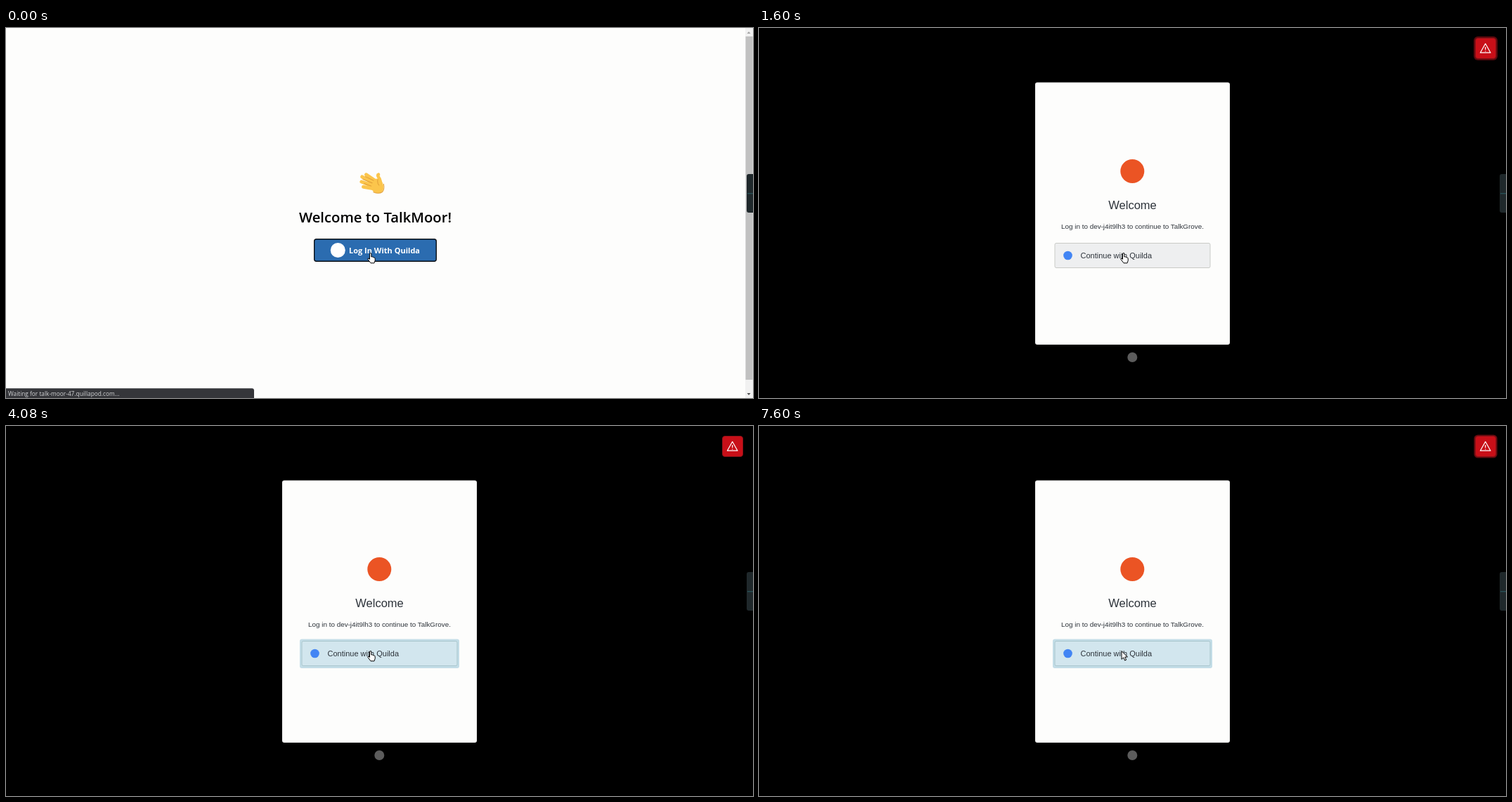
Animation, 1063 px wide and 527 px high, one loop 8000 ms. Source, as an HTML page:

```html
<!DOCTYPE html>
<html lang="en">
<head>
<meta charset="utf-8">
<title>Login flow</title>
<style>
  html, body { margin: 0; width: 100%; height: 100%; overflow: hidden; background: #000; }
  svg { display: block; width: 1063px; height: 527px; }
  .ui { font-family: "Open Sans", "Noto Sans", sans-serif; }
  .form { font-family: "Liberation Sans", Arial, sans-serif; fill: #2d333a; }
  .mid { text-anchor: middle; }
</style>
</head>
<body>
<svg viewBox="0 0 1063 527">
  <g id="home" class="ui">
    <rect width="1063" height="527" fill="#fdfdfc"/>
    <g id="wave" stroke-linecap="round" stroke-linejoin="round" fill="none">
      <g stroke="#fbc54c" stroke-width="5">
        <path d="M528 223L516 212M529 219L517.5 204.5M532 217L522 199M536 216L528.5 199.5"/>
        <path d="M538 222Q542 217 541.5 212Q541.5 208 543.5 208.500" stroke-width="4.500"/>
      </g>
      <path d="M524 218L536 212Q541 213 542 219Q541 229 535 231.500Q529 232.500 525 226Z" fill="#fbc54c" stroke="#fbc54c"/>
      <path d="M526 217L519.500 209M529.500 214L521 202.500M533 212L526 201M539 214Q535 218 536 222" stroke="#dd9a34" stroke-width=".9"/>
      <path d="M524 226Q529 233 535 232.500Q540 231 542.500 224" stroke="#e3a13a" stroke-width="1"/>
    </g>
    <text class="mid" x="525.5" y="277" font-size="20.3" font-weight="600">Welcome to TalkMoor!</text>
    <rect x="438.7" y="300.7" width="173.6" height="31.6" rx="3" fill="#2b6cb0" stroke="#0b0f14" stroke-width="1.4"/>
    <circle cx="472.300" cy="316.500" r="10.500" fill="#fff"/>
    <text x="488" y="321" font-size="11" font-weight="700" fill="#fff">Log In With Quilda</text>
    <rect x="1052" width="11" height="527" fill="#f1f1f1"/>
    <rect x="1052.5" y="12" width="10" height="489" fill="#c1c1c1"/>
    <path d="M1054.500 8h5l-2.500-3z" fill="#a3a3a3"/>
    <path d="M1054.500 520h5l-2.500 3z" fill="#505050"/>
  </g>

  <g id="login">
    <rect width="1063" height="527"/>
    <rect x="393" y="77.500" width="277" height="373.500" rx="3" fill="#fdfdfc"/>
    <circle cx="531.300" cy="204" r="17" fill="#eb5424"/>
    <circle cx="531.300" cy="469" r="7" fill="#5c5c5c"/>
    <g class="form">
      <text class="mid" x="531.5" y="257.500" font-size="16.5">Welcome</text>
      <text class="mid" x="531.5" y="285.500" font-size="9.9">Log in to dev-j4it9lh3 to continue to TalkGrove.</text>
      <rect id="ring" x="418" y="303.500" width="227" height="41.500" rx="3" fill="#c3dde7"/>
      <rect id="button" x="421" y="306.500" width="221" height="35" rx="2"/>
      <circle cx="439.500" cy="324" r="6.300" fill="#4285f4"/>
      <text x="457.5" y="328" font-size="11">Continue with Quilda</text>
    </g>
    <g id="alert">
      <rect id="glow" fill="#d0141f"/>
      <rect x="1019.5" y="14.500" width="29" height="29" rx="3.5" fill="#c80f18" stroke="#8f1218"/>
      <path d="M1033.700 22.300L1041 35.200H1026.400ZM1033.700 27v4M1033.700 32.600v1" fill="none" stroke="#fff" stroke-width="1.2" stroke-linejoin="round"/>
    </g>
  </g>

  <g id="status" class="ui">
    <path d="M0 513.300H350q3 0 3 3V527H0z" fill="#35363a"/>
    <text x="3" y="523.500" font-size="8.3" fill="#d2d3d5">Waiting for talk-moor-47.quillapod.com...</text>
  </g>

  <path d="M1063 208h-6q-3 0-3 3v49q0 3 3 3h6z" fill="#1f282b"/>
  <path d="M1055 235.800h8" stroke="#2b6268"/>

  <g fill="#fff" stroke="#000" stroke-width="1" stroke-linejoin="round">
    <path id="hand" d="M517.500 329.500V322q0-1.500 1.200-1.500t1.200 1.500v4q2-.8 2.300.6q1.500-.6 1.700.7q1.300-.3 1.300 1v3l-1.200 3.500h-5l-4-5.300q-.5-1.500 1-1.500z"/>
    <path id="arrow" d="M516 320.500v11.800l2.700-2.500l1.900 4.200l2-.9l-1.900-4.100h3.700z"/>
  </g>
</svg>
<script>
  const LOOP = 8000, LOGIN = 880, STATUS_END = 1200, CLICK = 2160, ARROW = 5640, FREEZE = 5760;
  const PULSE = 1400, GLOW_TIME = 560, SWING = 800;
  const $ = id => document.getElementById(id);
  const show = (id, on) => $(id).style.display = on ? "" : "none";
  const set = (id, attrs) => Object.entries(attrs).forEach(([k, v]) => $(id).setAttribute(k, v));

  function draw(t) {
    show("home", t < LOGIN);
    show("login", t >= LOGIN);
    show("status", t < STATUS_END);
    show("alert", t >= 960);
    show("hand", t < ARROW);
    show("arrow", t >= ARROW);

    const angle = -16 - 16 * Math.cos(Math.PI * t / SWING);
    set("wave", { transform: `rotate(${angle} 537 232)` });

    const focused = t >= CLICK;
    show("ring", focused);
    set("button", focused
      ? { fill: "#d2e6ee", stroke: "#a9c6cd" }
      : { fill: "#eeeff0", stroke: "#c9cbc7" });

    // The alert's shadow spreads and fades; the page stops moving at FREEZE.
    const q = Math.min(1, Math.min(t, FREEZE) % PULSE / GLOW_TIME);
    const spread = 5.6 * q, size = 30 + 2 * spread;
    set("glow", { x: 1019 - spread, y: 14 - spread, width: size, height: size, rx: 4 + spread, opacity: 0.7 * (1 - q) });
  }

  const start = performance.now();
  function tick() {
    draw((performance.now() - start) % LOOP);
    requestAnimationFrame(tick);
  }
  tick();
</script>
</body>
</html>
```
